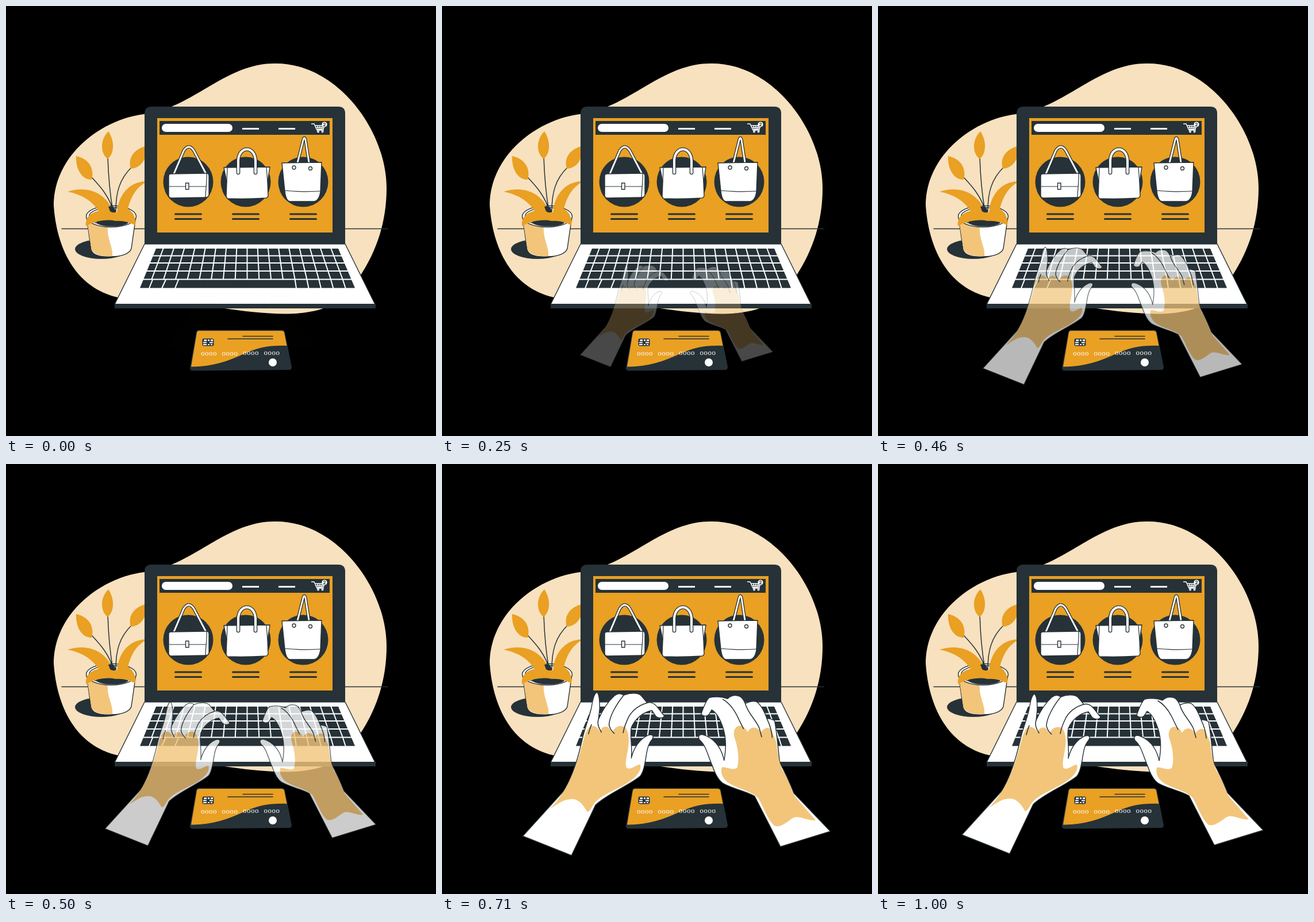
Animation of 748x748 px, one loop 1040 ms. Source, as an HTML page without scripts:

```html
<!DOCTYPE html>
<html lang="en">
<head>
<meta charset="utf-8">
<title>Online shopping</title>
<style>
@property --frame { syntax: "<number>"; inherits: true; initial-value: 0; }
@property --t { syntax: "<number>"; inherits: true; initial-value: 0; }
@property --s { syntax: "<number>"; inherits: true; initial-value: 0; }
@property --p { syntax: "<number>"; inherits: true; initial-value: 0; }

html, body { margin: 0; width: 100%; height: 100%; overflow: hidden; background: #000; }
svg { display: block; width: 100%; height: 100%; }

.dark { fill: #263238; }
.gold { fill: #e9a023; }
.skin { fill: #f2c57b; }
.white { fill: #fff; }
.line { fill: none; stroke: #263238; stroke-width: 1.5; stroke-linecap: round; stroke-linejoin: round; }
.thin { stroke-width: 1.2; }
.edge { fill: #fff; stroke: #263238; stroke-width: 1.4; stroke-linejoin: round; }
.keys { fill: none; stroke: #fff; stroke-width: 2; }
.strap { fill: none; stroke: #263238; stroke-width: 5.4; }
.strap + .strap { stroke: #fff; stroke-width: 2.8; }
.wide .strap { stroke-width: 6.6; }
.wide .strap + .strap { stroke-width: 4; }
.digits { font: 13px "Liberation Serif", serif; letter-spacing: .5px; fill: #fff; }
.badge { font: bold 8px Inter, sans-serif; fill: #263238; text-anchor: middle; }

/* 24 fps zoom on cubic-bezier(.36, -.01, .5, 1.38): --s solves x(s) = t, --p is y(s) */
.hands {
  --t: min(1, (var(--frame) + .7) / 24);
  --s: calc(var(--t) - (.08 * var(--t) - .66 * var(--t) * var(--t) + .58 * var(--t) * var(--t) * var(--t))
    / (1.08 - 1.32 * var(--t) + 1.74 * var(--t) * var(--t)));
  --p: calc(var(--s) * (-.03 + var(--s) * (4.2 - 3.17 * var(--s))));
  opacity: var(--p);
  transform: scale(calc(.5 + .5 * var(--p)));
  transform-origin: 408px 539px;
  animation: zoom 1040ms steps(25, end) -3ms infinite;
}
@keyframes zoom { from { --frame: 0; } to { --frame: 25; } }
</style>
</head>
<body>
<svg viewBox="0 0 748 748">
  <defs>
    <path id="caption" class="line" style="stroke-width:3" d="M294.500 362H339.500M294.500 370.500H339.500"/>
    <path id="columns" d="M401.300 421L398.700 476M383.100 421L377.900 476M364.900 421L357.100 476M346.700 421L336.300 476M328.500 421L315.500 476M310.300 421L294.700 476M292.100 421L273.900 476M273.900 421L253.100 476"/>
    <path id="strap1" d="M292 292L309 252Q318 238 327 252L348 292"/>
    <path id="strap2" d="M404 290V268C406 243 432 243 434 268V290" stroke-linecap="round"/>
    <path id="strap3" d="M507 273L517 233Q519 226 521 233L527 272"/>
  </defs>

  <path fill="#f8e1be" d="M470 100C400 98 345 152 288 175C268 184 255 186 241 188C165 197 83 260 83 347C88 420 120 490 195 507C270 502 395 535.500 485 535.500C512 535.500 535 532 552 526C585 515 605 490 617 468C645 425 662 375 662 317C662 215 575 100 470 100Z"/>
  <path class="line" d="M97 387.500H664"/>

  <g id="plant">
    <ellipse class="dark" cx="166" cy="423" rx="46" ry="17"/>
    <path class="edge" d="M140 366L148 424C151 434 166 437 183 436C201 436 215 431 218 422L226 366Z"/>
    <path class="skin" d="M141 374L148.500 423C152 433 168 436 185 435C187 420 175 405 177 383Z"/>
    <ellipse class="edge" cx="183" cy="366" rx="43.500" ry="18.500"/>
    <ellipse class="edge" cx="183" cy="366" rx="38.500" ry="15.500"/>
    <ellipse class="dark" cx="185" cy="376" rx="28" ry="7.500"/>
    <path class="line" d="M187 357C179 330 163 313 149 298M186 357C181 328 178 294 177 262M191 357C191 325 197 301 219 280"/>
    <path class="gold" d="M122 261C142 265 155 281 149 302C132 302 121 284 122 261ZM178 218C188 232 190 255 177 266C164 257 163 233 178 218ZM246 243C224 248 211 263 217 283C234 282 245 268 246 243ZM107 323C145 311 175 328 186 357L193 359C196 325 218 304 246 305C226 315 217 333 212 353C221 358 227 368 225 382C215 376 203 373 191 374C178 371 168 373 158 375C150 377 144 380 139 383C138 371 143 361 161 356C147 336 128 327 107 323Z"/>
    <path class="dark" d="M178 349Q184 347 188 350L192 358Q186 361 181 357Z"/>
  </g>

  <g id="laptop">
    <path class="dark" d="M241 415V187Q241 175 253 175H578Q590 175 590 187V415Z"/>
    <path class="gold" d="M263 195H568V394H263Z"/>
    <path class="dark" d="M267 200H563V224H267Z"/>
    <rect class="white" x="271" y="205" width="123" height="14" rx="7"/>
    <path class="keys" style="stroke-width:3" d="M411 213.500H440M474 213.500H503"/>
    <g fill="none" stroke="#fff" stroke-width="1.400">
      <path d="M531 205H536L541 216H553M537 208H554L552 214L541 215M542 208L543 215M546 208V215M550 208L549 215M538 211.500H552"/>
      <circle cx="543" cy="218.500" r="1.300"/>
      <circle cx="550.500" cy="218.500" r="1.300"/>
    </g>
    <circle class="white" cx="554" cy="206" r="4.600"/>
    <text class="badge" x="554" y="209">2</text>

    <circle class="dark" cx="317" cy="306" r="43.500"/>
    <circle class="dark" cx="417" cy="306" r="43.500"/>
    <circle class="dark" cx="517" cy="306" r="43.500"/>
    <use href="#caption"/>
    <use href="#caption" x="100"/>
    <use href="#caption" x="200"/>

    <g id="satchel">
      <use class="strap" href="#strap1"/><use class="strap" href="#strap1"/>
      <path class="edge" d="M287 292L349 291Q353 291 353 296V329Q352 333 347 333L288 334Q283 334 283 329V296Q283 292 287 292Z"/>
      <path class="line thin" d="M349 291C350 305 347 320 347 333M284 314H348"/>
      <rect class="edge" x="312.500" y="308" width="5.500" height="11"/>
    </g>
    <g id="tote" class="wide">
      <path class="edge" d="M379 281L459 280L455 306L456 331L453 334Q420 336 385 335L383 331L384 306Z"/>
      <path class="line thin" d="M384 306L385 282M455 306L453 281"/>
      <use class="strap" href="#strap2"/><use class="strap" href="#strap2"/>
    </g>
    <g id="bucket">
      <use class="strap" href="#strap3"/><use class="strap" href="#strap3"/>
      <path class="edge" d="M480 273L549 272L547 323Q545 338 536 340H494Q487 339 485 322Z"/>
      <path class="line thin" d="M485 321Q516 324 547 322"/>
      <circle class="edge" cx="501" cy="281" r="3"/>
      <circle class="edge" cx="529.500" cy="282.500" r="3"/>
    </g>

    <path class="edge" d="M241 414H590L642 519H189Z"/>
    <path class="dark" d="M189 518H643V526H189Z"/>
    <path class="dark" d="M261 422H578L607 490.500H233Z"/>
    <g class="keys">
      <path d="M250 434.500H590M245 447H595M240 461H600M235 475.500H605M419.500 421V476"/>
      <use href="#columns"/>
      <use href="#columns" transform="matrix(-1 0 0 1 839 0)"/>
      <path d="M255 476L249 491M278 476L271 491M300 476L294 491M502.700 476L505 491M523.500 476L526.500 491M544.300 476L548 491M565.100 476L569.300 491M585.900 476L590.700 491"/>
    </g>
  </g>

  <g id="card">
    <path class="dark" d="M335 563.500H480Q484 563.500 485 567L497 628Q497 633 492 633L325 634.500Q319 634 320 629L331 567Q332 563.500 335 563.500Z"/>
    <path class="gold" d="M336 565H479Q483 565 484 568L488.500 591C458 590 439 594 414 605C387 618 356 628 322 627.500L332 568Q333 565 336 565Z"/>
    <path class="line" d="M412 574.500H464M386 579H464"/>
    <rect class="dark" x="341.500" y="578.500" width="20" height="13" rx="3"/>
    <path class="white" d="M345 580H349V583H344ZM351 580H354V583H351ZM356 580H360V583H356ZM343 584.500H349V586.500H343ZM354 584.500H360V586.500H354ZM343 588H349V590H343ZM351 588H354V590H351ZM356 588H359V590H356Z"/>
    <g class="digits">
      <text x="339" y="607.500">oooo</text><text x="375.500" y="607.500">oooo</text>
      <text x="412" y="607">oooo</text><text x="448.500" y="607">oooo</text>
    </g>
    <circle class="white" cx="464" cy="620" r="7"/>
  </g>

  <g class="hands">
    <g id="left">
      <path class="edge" d="M146 645L217 567C232 540 240 512 247 482C251 462 259 445 263 426C265 414 267 403 272 400C277 402 277 418 277 428L275 446C283 428 292 415 302 406C308 401 314 402 318 405C328 401 342 400 348 406L358 418C365 416 371 420 375 425L387 440C386 445 376 445 372 440L366 431C350 434 337 446 331 460C328 475 333 490 331 512C335 494 346 479 360 473C368 471 370 475 366 481C357 491 357 508 354 521C352 532 350 538 346 543C325 560 290 573 270 592L229 678Z"/>
      <path class="skin" d="M193 598C222 569 236 530 248 487C251 475 254 463 261 458C269 456 274 460 277 467C281 458 288 456 293 461L298 469C303 457 314 455 321 460C327 469 327 481 326 491C324 508 319 521 323 529C331 533 339 523 346 523C350 536 335 548 320 557C300 568 274 578 266 592C262 599 260 603 256 604C250 594 242 581 228 582C213 583 207 590 193 598Z"/>
      <path class="line" d="M275 446C272 454 276 462 280 468M263 455Q260 463 258 471M318 405C304 422 293 443 293 456Q296 466 302 470M358 418C344 422 333 431 327 441C323 449 319 458 317 469"/>
    </g>
    <g id="right">
      <path class="edge" d="M670 637L608 572C600 552 592 535 584 520C581 500 580 475 575 448C570 446 566 444 562 445C558 434 552 421 544 416C537 414 530 417 525 419C522 412 519 407 513 406C504 404 498 408 495 411C485 407 472 407 464 409C458 414 453 428 450 437C454 442 460 441 463 438L468 430C477 435 483 448 487 460C492 475 493 495 489 516C484 492 470 477 452 472C445 472 444 477 448 482C458 490 462 510 469 525C474 540 480 550 487 555C505 565 525 568 541 577L585 663Z"/>
      <path class="skin" d="M485 528C494 526 501 534 511 529C516 514 512 492 507 478C503 465 509 457 516 457C523 458 527 463 529 468C534 458 544 457 552 468C558 460 566 458 570 465L578 485C580 505 583 519 588 532C601 552 603 568 611 579L645 618C631 620 616 608 605 615C594 623 583 632 574 627C562 615 556 595 547 580C537 569 515 565 499 556C489 550 482 540 485 528Z"/>
      <path class="line" d="M487 412C501 420 509 434 515 448L522 462M525 419C530 437 543 446 549 461L553 476M562 445C567 455 570 465 571 477"/>
    </g>
  </g>
</svg>
</body>
</html>
```
